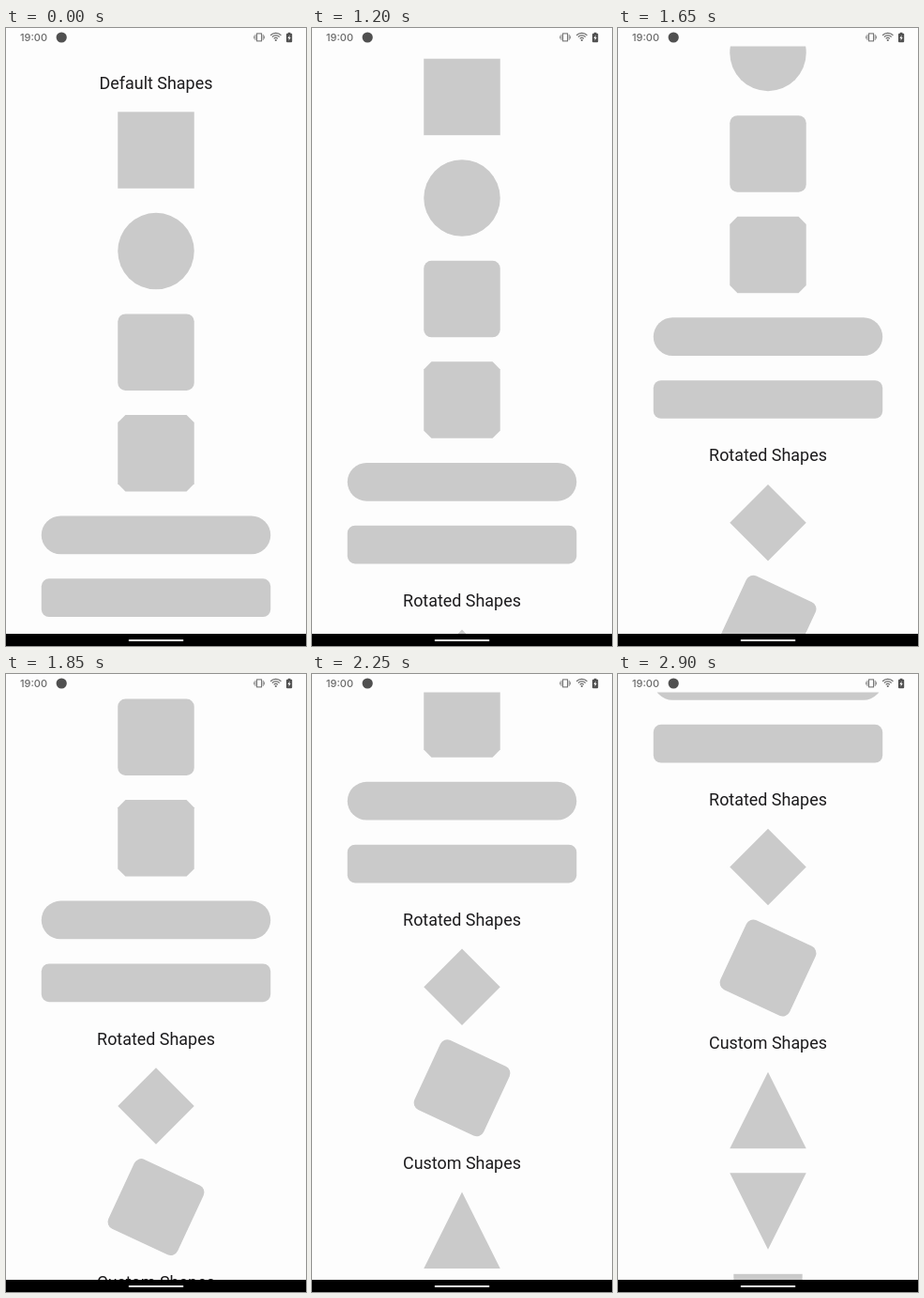
Write an HTML page with a canvas that moves like this. It is 320 by 658 pixels and loops after 2.95 s.

```html
<!DOCTYPE html>
<html lang="en">
<head>
<meta charset="utf-8">
<title>Shapes</title>
<style>
html, body { margin: 0; width: 100%; height: 100%; overflow: hidden; background: #fdfdfd; }
canvas { display: block; width: 320px; height: 658px; }
</style>
</head>
<body>
<canvas id="stage"></canvas>
<script>
const W = 320, H = 658, LOOP = 2950, STEP = 50, START = 1050;
const DP = 320 / 392.73;
const BOX = 100 * DP, GAP = 32 * DP, PITCH = BOX + GAP, CORNER = 10 * DP;
const PAPER = '#fdfdfd', FILL = '#cacaca', INK = '#1c1b1d', STATUS = '#6a6a6a', DARK = '#505050';
const MID = W / 2, TOP = 24 * DP, BOTTOM = 645;

const canvas = document.getElementById('stage');
const ctx = canvas.getContext('2d');
const ratio = window.devicePixelRatio || 1;
canvas.width = W * ratio;
canvas.height = H * ratio;

// Scroll keys: time, offset, speed per 50 ms
const KEYS = [
  [1050, 11.3, 14], [1400, 123.3, 17], [1650, 211.2, 17.3],
  [2050, 341.6, 15.8], [2500, 474.5, 12], [2900, 532.5, 3]
];

function scrollAt(time) {
  const t = Math.floor(time / STEP) * STEP;
  if (t < START) return 0;
  let i = 0;
  while (i < KEYS.length - 2 && t > KEYS[i + 1][0]) i++;
  const [t0, y0, v0] = KEYS[i], [t1, y1, v1] = KEYS[i + 1];
  const span = t1 - t0, n = span / STEP;
  const u = (t - t0) / span, u2 = u * u, u3 = u2 * u;
  return (2 * u3 - 3 * u2 + 1) * y0 + (u3 - 2 * u2 + u) * n * v0 +
         (3 * u2 - 2 * u3) * y1 + (u3 - u2) * n * v1;
}

function poly(points) {
  ctx.beginPath();
  points.forEach(([x, y]) => ctx.lineTo(x, y));
  ctx.closePath();
  ctx.fill();
}

function round(x, y, w, h, r) {
  ctx.beginPath();
  ctx.roundRect(x, y, w, h, r);
  ctx.fill();
}

function disc(x, y, r) {
  ctx.beginPath();
  ctx.arc(x, y, r, 0, Math.PI * 2);
  ctx.fill();
}

function heading(text, top) {
  ctx.fillStyle = INK;
  ctx.font = `${22 * DP}px Roboto, sans-serif`;
  ctx.textAlign = 'center';
  ctx.fillText(text, MID, top - 24.6);
  ctx.fillStyle = FILL;
}

function drawList() {
  const l = MID - BOX / 2, r = MID + BOX / 2, c = CORNER;
  const wide = 300 * DP, bar = 50 * DP;
  let y = 89.3;

  heading('Default Shapes', y);
  ctx.fillRect(l, y, BOX, BOX);
  y += PITCH;
  disc(MID, y + BOX / 2, BOX / 2);
  y += PITCH;
  round(l, y, BOX, BOX, c);
  y += PITCH;
  const b = y + BOX;
  poly([[l + c, y], [r - c, y], [r, y + c], [r, b - c], [r - c, b], [l + c, b], [l, b - c], [l, y + c]]);
  y += PITCH;
  round(MID - wide / 2, y, wide, bar, bar / 2);
  y += bar + GAP;
  round(MID - wide / 2, y, wide, bar, c);

  y = 697.2;
  heading('Rotated Shapes', y);
  poly([[MID, y], [r, y + BOX / 2], [MID, y + BOX], [l, y + BOX / 2]]);
  y += PITCH;
  ctx.save();
  ctx.translate(MID, y + BOX / 2);
  ctx.rotate(25 * Math.PI / 180);
  round(-BOX / 2, -BOX / 2, BOX, BOX, c);
  ctx.restore();

  y = 956.2;
  heading('Custom Shapes', y);
  poly([[MID, y], [r, y + BOX], [l, y + BOX]]);
  y += PITCH;
  poly([[l, y], [r, y], [MID, y + BOX]]);
  y += PITCH;
  ctx.fillRect(MID - BOX * 0.45, y, BOX * 0.9, BOX);
}

function drawStatus() {
  ctx.fillStyle = STATUS;
  ctx.font = '500 11px Inter, sans-serif';
  ctx.textAlign = 'left';
  ctx.fillText('19:00', 15, 14.2);
  ctx.fillStyle = DARK;
  disc(59.2, 10, 5.6);

  // Vibrate
  ctx.strokeStyle = STATUS;
  ctx.lineWidth = 1;
  ctx.strokeRect(267.6, 5.9, 5, 8);
  ctx.beginPath();
  for (const [x, h] of [[264.7, 1.5], [266, 3], [274.2, 3], [275.6, 1.5]]) {
    ctx.moveTo(x, 9.9 - h);
    ctx.lineTo(x, 9.9 + h);
  }
  ctx.lineWidth = 0.8;
  ctx.stroke();

  // Wi-Fi
  ctx.lineWidth = 1.1;
  for (const r of [3, 5.5, 8]) {
    ctx.beginPath();
    ctx.arc(287.8, 13.4, r, -Math.PI * 0.75, -Math.PI * 0.25);
    ctx.stroke();
  }
  ctx.fillStyle = STATUS;
  disc(287.8, 13, 1.1);

  // Battery
  ctx.fillStyle = DARK;
  round(299, 5.8, 6.2, 9.4, 1);
  ctx.fillRect(300.8, 4.8, 2.6, 1.5);
  ctx.fillStyle = PAPER;
  poly([[302.6, 7.6], [300.5, 11], [301.8, 11], [301.6, 13.4], [303.7, 10], [302.4, 10]]);
}

function draw(time) {
  ctx.setTransform(ratio, 0, 0, ratio, 0, 0);
  ctx.fillStyle = PAPER;
  ctx.fillRect(0, 0, W, H);

  ctx.save();
  ctx.beginPath();
  ctx.rect(0, TOP, W, BOTTOM - TOP);
  ctx.clip();
  ctx.translate(0, -scrollAt(time));
  drawList();
  ctx.restore();

  drawStatus();
  ctx.fillStyle = '#000';
  ctx.fillRect(0, BOTTOM, W, H - BOTTOM);
  ctx.fillStyle = '#ececec';
  round(130.7, 651, 58.7, 2, 1);
}

const begin = performance.now();
function tick() {
  draw((performance.now() - begin) % LOOP);
  requestAnimationFrame(tick);
}
tick();
</script>
</body>
</html>
```
